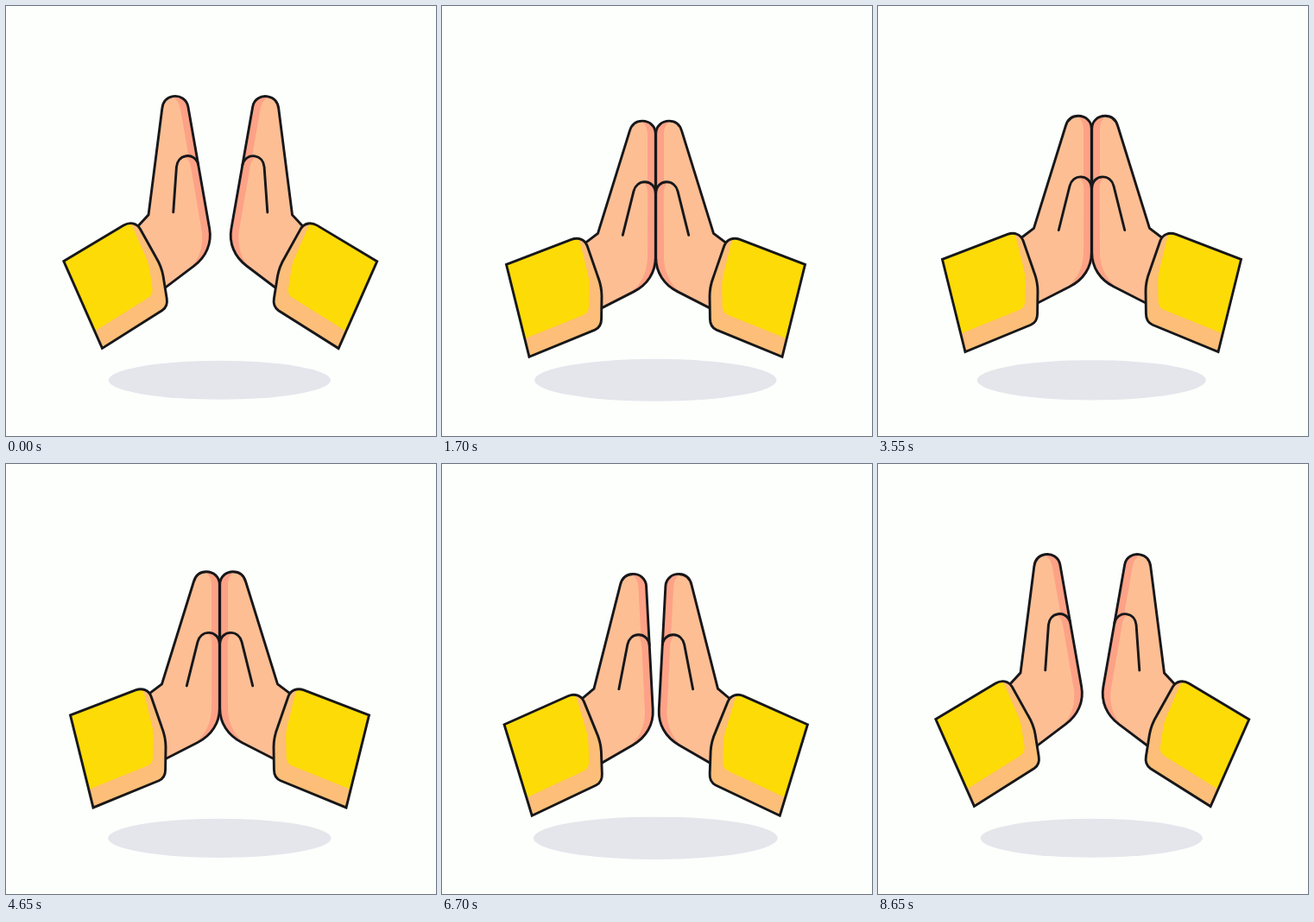
These frames come from a looping animation (498x498 px, 8.7 s). An HTML page with a canvas:

```html
<!DOCTYPE html>
<html lang="en">
<head>
<meta charset="utf-8">
<title>Folded hands</title>
<style>
  html, body { margin: 0; width: 100%; height: 100%; overflow: hidden; background: #fdfffc; }
  canvas { display: block; }
</style>
</head>
<body>
<canvas id="stage" width="498" height="498"></canvas>
<script>
const ctx = document.getElementById('stage').getContext('2d');
const LOOP = 8700;
const BOB = LOOP / 2;
const OPEN_ANGLE = 9.95 * Math.PI / 180;
const PIVOT_X = 100;
const INK = '#17171a';

// Left hand in the closed pose; the right one is its mirror image.
const hand = new Path2D('M160 270.5 L180.5 255 L217.3 136.5 C219.5 129 225 124.8 232 124.8 ' +
  'C240.5 124.8 247.3 131 247.3 139.5 L247.3 283 C247.3 300 238 314.5 222 322.5 L180 344 Z');
const shade = new Path2D('M228 123 C235 127 238 132 238 141 L238 195 L233 196 ' +
  'C237 199 238.3 203 238.3 210 L238 285 C237 303 229 317 213 328 L260 332 L260 120 Z');
const thumb = new Path2D('M209.3 257 L222 206 C223.8 199.3 228.8 195.4 235 195.4 C241.5 195.4 247 200.5 247.3 208');
const sleeve = new Path2D('M74.5 291 L150 262 C158 259 165 262 168 269 L180.5 305 ' +
  'C184 314 185 320 185 328 L184.6 354 C184.6 360 182 364.5 177 366.8 L101 398 Z');
const cloth = new Path2D('M74.5 291 L150 262 C155 260.3 158 260.5 160 266 L168 299 ' +
  'C170 306 170.7 311 170.7 318 L170.3 338 C170.3 344 168.5 347.5 163 349.8 L95.5 377 Z');

const clamp = v => Math.min(1, Math.max(0, v));
const smooth = s => s * s * (3 - 2 * s);

// Cubic Bezier easing (.25, .1, .25, 1), solved by bisection.
function settle(x) {
  const curve = (k, a, b) => 3 * (1 - k) * (1 - k) * k * a + 3 * (1 - k) * k * k * b + k * k * k;
  let lo = 0, hi = 1;
  for (let i = 0; i < 24; i++) {
    const mid = (lo + hi) / 2;
    if (curve(mid, .25, .25) < x) lo = mid; else hi = mid;
  }
  return curve(lo, .1, 1);
}

function openness(t) {
  return t < 3000 ? 1 - smooth(clamp(t / 1150)) : settle(clamp((t - 6200) / 2450));
}

function fill(path, color) {
  ctx.fillStyle = color;
  ctx.fill(path);
}

function drawHand(open, drop, pivotY) {
  ctx.save();
  ctx.translate(PIVOT_X, pivotY + drop);
  ctx.rotate(-OPEN_ANGLE * open);
  ctx.translate(-PIVOT_X, -pivotY - 0.5);

  fill(hand, '#fdbe94');
  ctx.save();
  ctx.clip(hand);
  fill(shade, '#fda286');
  ctx.restore();
  ctx.stroke(hand);
  ctx.stroke(thumb);

  fill(sleeve, '#fcbe78');
  fill(cloth, '#fddb06');
  ctx.stroke(sleeve);
  ctx.restore();
}

function draw(t) {
  const low = (1 - Math.cos(2 * Math.PI * t / BOB)) / 2;
  const open = openness(t);

  ctx.fillStyle = '#fdfffc';
  ctx.fillRect(0, 0, 498, 498);

  ctx.fillStyle = '#e5e5ec';
  ctx.beginPath();
  ctx.ellipse(247.3, 433.3, 128.6 + 13 * low, 22.5 + 2.2 * low, 0, 0, 2 * Math.PI);
  ctx.fill();

  ctx.strokeStyle = INK;
  ctx.lineWidth = 2.9;
  ctx.lineCap = 'round';
  ctx.lineJoin = 'miter';
  drawHand(open, 10 * low, 337);
  ctx.save();
  ctx.translate(495, 0);
  ctx.scale(-1, 1);
  drawHand(open, 10 * low, 346);
  ctx.restore();
}

const start = performance.now();
function tick() {
  draw((performance.now() - start) % LOOP);
  requestAnimationFrame(tick);
}
tick();
</script>
</body>
</html>
```
